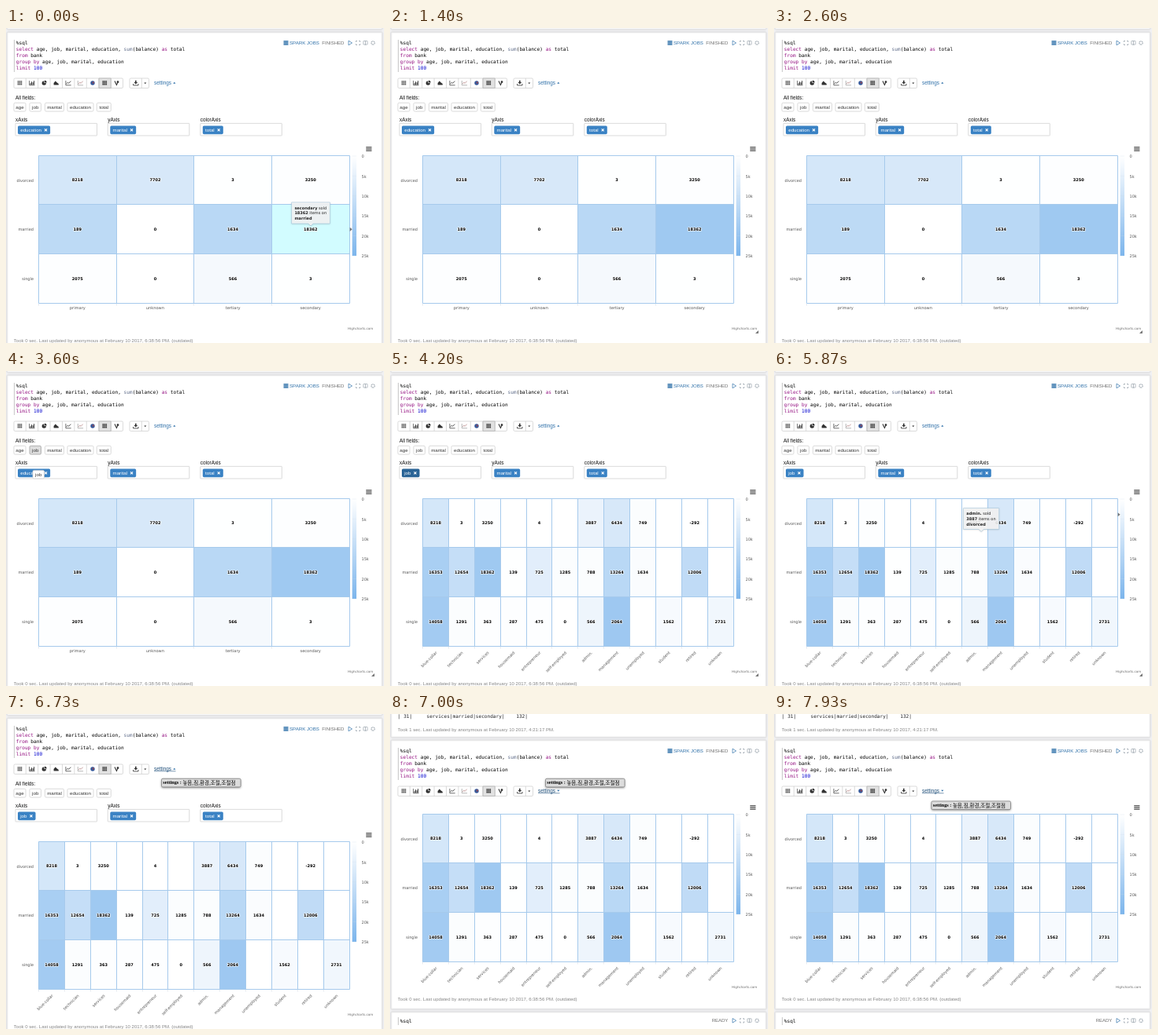
An HTML page with a canvas that plays this animation: 480x401 px, repeating every 8000 ms.

```html
<!DOCTYPE html>
<html lang="en">
<head>
<meta charset="utf-8">
<title>Notebook heatmap</title>
<style>
html, body { margin: 0; width: 100%; height: 100%; overflow: hidden; background: #fff; }
canvas { display: block; width: 480px; height: 401px; }
</style>
</head>
<body>
<canvas id="stage" width="480" height="401"></canvas>
<script>
const ctx = document.getElementById('stage').getContext('2d');
const LOOP = 8000;
const SANS = '"Liberation Sans", Arial, sans-serif';
const CHART = '"DejaVu Sans", sans-serif';
const MONO = '"DejaVu Sans Mono", monospace';
const LINK = '#3071a9', GREY = '#6c6c6c', DARK = '#333', LABEL = '#555', NOTE = '#858585';

// Times in ms at which the state of the page changes
const HOVER_OUT = 330, HANDLE_ON = 1270, DRAG = 2800, DRAG_END = 3450, DROP = 3870;
const CHIP_OUT = 4600, HANDLE_OFF = 6270, POPUP = 6530, COLLAPSE = 6930;

const ROWS = ['divorced', 'married', 'single'];
const PLOT = { left: 41.5, top: 162.3, width: 394.5, height: 188 };

// Each cell is "label" or "label:heat" where overlapping points hide the stronger one
const byEducation = {
  columns: ['primary', 'unknown', 'tertiary', 'secondary'],
  cells: ['8218 7702 3:100 3250:300', '189:12654 0 1634:13264 18362', '2075:300 0 566:2000 3:100']
};
const byJob = {
  columns: ['blue-collar', 'technician', 'services', 'housemaid', 'entrepreneur', 'self-employed',
    'admin.', 'management', 'unemployed', 'student', 'retired', 'unknown'],
  cells: [
    '8218 3 3250:300 - 4 - 3887 6434:7702 749 - -292:0 -',
    '16353 12654:11000 18362 139 725:5600 1285:800 788 13264 1634:900 - 12006 -',
    '14058:17600 1291:700 363 287 475 0 566:3300 2064:18600 - 1562 - 2731'
  ]
};
for (const data of [byEducation, byJob]) {
  data.cells = data.cells.map(row => row.split(' ').map(cell => {
    if (cell === '-') return { label: '', heat: 0 };
    const [label, heat] = cell.split(':');
    return { label, heat: +(heat ?? label) };
  }));
}

// Pointer stops over the job chart: time, column, row, value
const stops = [
  [4730, 1, 0, 3], [4900, 3, 1, 139], [5030, 5, 1, 1285], [5225, 7, 0, 7702],
  [5600, 7, 1, 13264], [5800, 6, 0, 3887], [5930, 5, 0, 0]
];
const JOB_OUT = 5960;

const clamp = v => Math.max(0, Math.min(1, v));
const ease = v => { v = clamp(v); return v * v * (3 - 2 * v); };
const crisp = v => Math.floor(v) + 0.5;

function heatColor(value, hover) {
  const k = clamp(value / 25000);
  const rgb = [124, 181, 236].map(c => Math.min(255, Math.round(255 + (c - 255) * k + (hover ? 51 : 0))));
  return `rgb(${rgb})`;
}

function text(str, x, y, font, color, align = 'left') {
  ctx.font = font;
  ctx.fillStyle = color;
  ctx.textAlign = align;
  ctx.textBaseline = 'middle';
  ctx.fillText(str, x, y);
  return ctx.measureText(str).width;
}

function box(x, y, w, h, fill, stroke, radius = 0, line = 0.7) {
  ctx.beginPath();
  ctx.roundRect(x, y, w, h, radius);
  if (fill) { ctx.fillStyle = fill; ctx.fill(); }
  if (stroke) { ctx.strokeStyle = stroke; ctx.lineWidth = line; ctx.stroke(); }
}

function path(points, { fill, stroke, line = 0.8, close }) {
  ctx.beginPath();
  for (let i = 0; i < points.length; i += 2) ctx.lineTo(points[i], points[i + 1]);
  if (close) ctx.closePath();
  if (fill) { ctx.fillStyle = fill; ctx.fill(); }
  if (stroke) { ctx.strokeStyle = stroke; ctx.lineWidth = line; ctx.stroke(); }
}

function disc(x, y, r, fill, from = 0, to = Math.PI * 2) {
  ctx.beginPath();
  ctx.moveTo(x, y);
  ctx.arc(x, y, r, from, to);
  ctx.fillStyle = fill;
  ctx.fill();
}

function shifted(dy, draw) {
  ctx.save();
  ctx.translate(0, dy);
  draw();
  ctx.restore();
}

function card(top, bottom) {
  ctx.save();
  ctx.shadowColor = 'rgba(0,0,0,.18)';
  ctx.shadowBlur = 2;
  box(1.5, top, 476, bottom - top, '#fff', '#e8e8ea', 1);
  ctx.restore();
}

function controls(y) {
  path([435, y - 2.8, 439.5, y, 435, y + 2.8], { stroke: LINK, line: 0.7, close: true });
  for (const [sx, sy] of [[-1, -1], [1, -1], [-1, 1], [1, 1]]) {
    path([447 + sx * 2.6, y + sy, 447 + sx * 2.6, y + sy * 2.6, 447 + sx, y + sy * 2.6], { stroke: '#9aa4ad' });
  }
  box(453.8, y - 2.5, 5.2, 4.6, null, '#9aa4ad', 0.5);
  path([456.4, y - 2.5, 456.4, y + 2.8], { stroke: '#9aa4ad' });
  ctx.beginPath();
  ctx.arc(466, y, 2.1, 0, Math.PI * 2);
  ctx.strokeStyle = '#9aa4ad';
  ctx.lineWidth = 1.2;
  ctx.setLineDash([1.1, 0.55]);
  ctx.stroke();
  ctx.setLineDash([]);
}

function query() {
  const keywords = /^(select|from|group|by|as|limit)$/;
  const lines = ['%sql', 'select age, job, marital, education, sum(balance) as total', 'from bank',
    'group by age, job, marital, education', 'limit 100'];
  path([10.5, 15, 10.5, 56], { stroke: '#c8c8c8', line: 1 });
  lines.forEach((line, i) => {
    let x = 12.8;
    for (const part of line.match(/\w+|\W+/g)) {
      const color = keywords.test(part) ? '#930f80' : part === 'sum' ? '#5c6a88' : /^\d/.test(part) ? '#0000cd' : '#000';
      x += text(part, x, 19.7 + i * 8, `6.15px ${MONO}`, color);
    }
  });
}

function chartIcons() {
  const y = 70;
  const at = i => 17.6 + i * 15.4;
  const grid = (x, color) => {
    for (let i = 0; i < 9; i++) box(x - 2.9 + (i % 3) * 2, y - 2.7 + Math.floor(i / 3) * 1.9, 1.6, 1.4, color);
  };
  box(10, 64, 138.5, 12.5, '#fff', '#ccc', 1.5);
  box(118, 64, 15.3, 12.5, '#e2e2e2', '#adadad');
  for (let i = 1; i < 9; i++) path([9.9 + i * 15.4, 64, 9.9 + i * 15.4, 76.5], { stroke: '#ccc', line: 0.7 });
  grid(at(0), '#444');
  path([at(1) - 3.3, y - 3, at(1) - 3.3, y + 2.8, at(1) + 3.5, y + 2.8], { stroke: DARK, line: 0.7 });
  [2, 4, 3, 5].forEach((h, i) => box(at(1) - 2.4 + i * 1.5, y + 2.2 - h, 1, h, DARK));
  disc(at(2), y, 2.8, DARK, 0.1, Math.PI * 1.5);
  disc(at(2) + 0.6, y - 0.6, 2.7, DARK, -Math.PI / 2, 0);
  path([at(3) - 3.2, y + 2.6, at(3) - 3.2, y, at(3) - 1, y - 2.4, at(3) + 1, y - 0.6, at(3) + 3, y + 1, at(3) + 3, y + 2.6], { fill: DARK });
  for (const [i, color] of [[4, DARK], [5, '#999']]) {
    path([at(i) - 3.3, y - 3, at(i) - 3.3, y + 2.8, at(i) + 3.5, y + 2.8], { stroke: color, line: 0.7 });
    path([at(i) - 2.6, y + 1.2, at(i) - 0.8, y - 0.8, at(i) + 0.6, y + 0.4, at(i) + 3, y - 2.4], { stroke: i === 5 ? '#b98a8a' : color });
  }
  disc(at(6), y, 2.7, '#35589a');
  disc(at(6) + 0.8, y - 0.5, 1.2, '#8d4a5c');
  grid(at(7), '#222');
  path([at(8) - 2.8, y - 2.4, at(8) - 0.4, y + 2.5, at(8) + 1, y - 0.4], { stroke: DARK, line: 1.1 });
  disc(at(8) + 1.2, y - 1.3, 1.4, DARK);

  box(157, 64, 24.5, 12.5, '#fff', '#ccc', 1.5);
  path([172.3, 64, 172.3, 76.5], { stroke: '#ccc', line: 0.7 });
  box(164, 66.8, 1.6, 2.6, DARK);
  path([162.4, 69, 167.2, 69, 164.8, 71.4], { fill: DARK });
  path([161.6, 71, 161.6, 73, 168, 73, 168, 71], { stroke: DARK });
  path([175.3, 69.4, 178.3, 69.4, 176.8, 71.2], { fill: DARK });
}

function header(t) {
  query();
  for (let i = 0; i < 3; i++) box(352.5, 16.2 + i * 2, 6, 1.5, LINK);
  text('SPARK JOBS', 360, 19.2, `6.1px ${SANS}`, LINK);
  text('FINISHED', 401.3, 19.2, `6px ${SANS}`, GREY);
  controls(19);
  chartIcons();
  const open = t < COLLAPSE;
  const hovered = t >= 6400;
  const width = text('settings', 188, 70, `6.4px ${SANS}`, hovered ? '#23527c' : LINK);
  const tip = open ? -1 : 1;
  path([212.2, 69.7 - tip, 215.4, 69.7 - tip, 213.8, 69.7 + tip], { fill: LINK });
  if (hovered) path([188, 72.8, 188 + width + 5.5, 72.8], { stroke: '#23527c', line: 0.6 });
}

function axisChip(name, x, hover) {
  ctx.font = `6.2px ${SANS}`;
  const width = ctx.measureText(name).width + 14.3;
  box(x, 124.4, width, 10.8, hover ? '#2a6496' : '#3a82c4', null, 1.6);
  text(name, x + 3.2, 130.2, `6.2px ${SANS}`, '#fff');
  const cx = x + width - 5.6;
  path([cx - 1.5, 128.3, cx + 1.5, 131.3], { stroke: '#fff', line: 1.1 });
  path([cx - 1.5, 131.3, cx + 1.5, 128.3], { stroke: '#fff', line: 1.1 });
}

function settings(t) {
  const dragging = t >= DRAG && t < DROP;
  text('All fields:', 12, 89, `6.3px ${SANS}`, '#111');
  const fields = [['age', 10, 15], ['job', 30, 14.5], ['marital', 49.5, 24], ['education', 78, 33], ['total', 115.3, 18]];
  for (const [name, x, w] of fields) {
    const active = name === 'job' && dragging;
    box(x, 95.3, w, 10.8, active ? '#dedede' : '#fff', active ? '#999' : '#ccc', 1.5);
    text(name, x + w / 2, 101.2, `6.2px ${SANS}`, DARK, 'center');
  }
  const axes = [['xAxis', t < DROP ? 'education' : 'job', 12], ['yAxis', 'marital', 129.3], ['colorAxis', 'total', 246.8]];
  for (const [title, value, x] of axes) {
    text(title, x, 117.5, `6.4px ${SANS}`, '#111');
    box(x, 121.4, 103.5, 15.6, '#fff', '#ccc', 0.5);
    axisChip(value, x + 3, value === 'job' && t < CHIP_OUT);
  }
  if (dragging) {
    const k = ease((t - DRAG) / (DRAG_END - DRAG));
    const x = 30 + 4 * k, y = 95.4 + 31 * k;
    box(x, y, 14.5, 10.6, '#fff', '#ccc', 1.5);
    text('job', x + 7.2, y + 5.6, `6.2px ${SANS}`, DARK, 'center');
  }
}

// Tooltip and hovered cell at time t
function pointer(t) {
  if (t < 870) {
    return { col: 3, row: 1, value: 18362, x: 387, y: 249, hover: t < HOVER_OUT, alpha: clamp((870 - t) / 150) };
  }
  if (t < stops[0][0] || t >= HANDLE_OFF) return null;
  const centre = ([, col, row]) => [PLOT.left + (col + 0.5) * PLOT.width / 12, PLOT.top + (row + 0.5) * PLOT.height / 3 - 7];
  let [x, y] = centre(stops[0]);
  let current = stops[0];
  stops.forEach((stop, i) => {
    if (t < stop[0]) return;
    const until = Math.min(t, stops[i + 1]?.[0] ?? t);
    const k = 1 - Math.exp((stop[0] - until) / 50);
    const [tx, ty] = centre(stop);
    x += (tx - x) * k;
    y += (ty - y) * k;
    current = stop;
  });
  return { col: current[1], row: current[2], value: current[3], x, y, hover: t < JOB_OUT, alpha: clamp((HANDLE_OFF - t) / 150) };
}

function tooltip(p, columns) {
  const bold = `bold 5px ${CHART}`, plain = `5px ${CHART}`;
  const lines = [[columns[p.col], ' sold'], [String(p.value), ' items on'], [ROWS[p.row], '']];
  const width = Math.max(...lines.map(([a, b]) => {
    ctx.font = bold;
    const w = ctx.measureText(a).width;
    ctx.font = plain;
    return w + ctx.measureText(b).width;
  })) + 8;
  const left = p.x - width / 2, top = p.y - 27;
  const outline = [left, top, left + width, top, left + width, p.y, p.x + 3, p.y, p.x, p.y + 3, p.x - 3, p.y, left, p.y];
  ctx.save();
  ctx.globalAlpha = p.alpha;
  ctx.shadowColor = 'rgba(0,0,0,.25)';
  ctx.shadowBlur = 2;
  ctx.shadowOffsetY = 0.6;
  path(outline, { fill: 'rgba(249,249,249,.87)', close: true });
  ctx.shadowColor = 'transparent';
  path(outline, { stroke: '#a5c6dc', line: 0.6, close: true });
  lines.forEach(([a, b], i) => {
    const y = top + 7.4 + i * 6.7;
    const w = text(a, left + 3.8, y, bold, '#222');
    text(b, left + 3.8 + w, y, plain, '#222');
  });
  ctx.restore();
}

function colorAxis(marker) {
  const top = 163, height = 127;
  const fill = ctx.createLinearGradient(0, top, 0, top + height);
  fill.addColorStop(0, '#fff');
  fill.addColorStop(1, '#7cb5ec');
  box(439.6, top, 5.4, height, fill);
  for (let i = 0; i <= 5; i++) {
    const y = top + i * height / 5;
    path([439.6, y, 445, y], { stroke: 'rgba(200,215,230,.6)', line: 0.4 });
    text(i ? i * 5 + 'k' : '0', 451.5, y + 0.9, `5px ${CHART}`, LABEL);
  }
  if (marker !== null) {
    const y = top + marker / 25000 * height;
    path([436.6, y - 2.6, 439.6, y, 436.6, y + 2.6], { fill: '#777' });
  }
}

function chart(t) {
  const data = t < DROP ? byEducation : byJob;
  const p = pointer(t);
  const count = data.columns.length;
  const w = PLOT.width / count, h = PLOT.height / 3;
  const colX = c => crisp(PLOT.left + c * w), rowY = r => crisp(PLOT.top + r * h);

  for (let i = 0; i < 3; i++) box(457.2, 151.2 + i * 2.2, 7.2, 1.2, '#444');
  data.cells.forEach((row, r) => {
    text(ROWS[r], 35, PLOT.top + (r + 0.5) * h + 0.7, `5px ${CHART}`, LABEL, 'right');
    row.forEach((cell, c) => {
      const hover = p && p.hover && p.col === c && p.row === r;
      const x = colX(c), y = rowY(r);
      box(x, y, colX(c + 1) - x, rowY(r + 1) - y, heatColor(cell.heat, hover));
    });
  });
  const line = { stroke: '#a6caec', line: 1 };
  for (let c = 0; c <= count; c++) path([colX(c), rowY(0), colX(c), rowY(3)], line);
  for (let r = 0; r <= 3; r++) path([colX(0), rowY(r), colX(count), rowY(r)], line);

  data.cells.forEach((row, r) => row.forEach((cell, c) => {
    const x = PLOT.left + (c + 0.5) * w, y = PLOT.top + (r + 0.5) * h + 0.4;
    ctx.font = `bold 5px ${CHART}`;
    ctx.textAlign = 'center';
    ctx.textBaseline = 'middle';
    ctx.strokeStyle = 'rgba(255,255,255,.8)';
    ctx.lineWidth = 1.6;
    ctx.lineJoin = 'round';
    ctx.strokeText(cell.label, x, y);
    text(cell.label, x, y, `bold 5px ${CHART}`, '#000', 'center');
  }));
  data.columns.forEach((name, c) => {
    const x = PLOT.left + (c + 0.5) * w;
    path([colX(c), 351, colX(c), 353.5], { stroke: '#d4dce6', line: 0.6 });
    if (count === 4) return text(name, x, 356.8, `5.1px ${CHART}`, LABEL, 'center');
    ctx.save();
    ctx.translate(x + 1.3, 358);
    ctx.rotate(-Math.PI / 4);
    text(name, 0, 0, `5px ${CHART}`, LABEL, 'right');
    ctx.restore();
  });
  colorAxis(p && p.hover ? p.value : null);
  text('Highcharts.com', 466.3, 382.5, `4.1px ${CHART}`, '#6a6a6a', 'right');
  if (t >= HANDLE_ON && t < HANDLE_OFF) path([467.8, 385, 467.8, 388.8, 464, 388.8], { fill: '#666' });
  if (p) tooltip(p, data.columns);
  text('Took 0 sec. Last updated by anonymous at February 10 2017, 6:38:56 PM. (outdated)',
    9.8, 398.7, `6px ${SANS}`, NOTE);
}

function popup(t) {
  if (t < POPUP) return;
  const [x, y] = t < 7330 ? [197.5, 82.3] : [200, 111];
  ctx.save();
  ctx.shadowColor = 'rgba(0,0,0,.5)';
  ctx.shadowBlur = 3;
  ctx.shadowOffsetY = 1;
  box(x, y, 100.5, 10.6, '#dcdcdc', null, 1.5);
  ctx.restore();
  box(x, y, 100.5, 10.6, null, '#777', 1.5);
  const w = text('settings : ', x + 1.8, y + 5.4, 'bold 6.2px "Liberation Serif", Times, serif', '#000');
  text('놓음,짐,환경,조절,조절점', x + 1.8 + w, y + 5.2, '6.5px "Noto Sans CJK KR", "Noto Sans CJK", sans-serif', '#000');
}

function render(t) {
  const collapsed = t >= COLLAPSE;
  const topShift = collapsed ? 28 : 0;
  const chartShift = collapsed ? -35 : 0;
  ctx.fillStyle = '#f1f1f3';
  ctx.fillRect(0, 0, 480, 401);
  card(-40, 1.5 + topShift);
  card(5.5 + topShift, 410.5 + chartShift);
  if (collapsed) {
    text('| 31|     services|married|secondary|    132|', 9.8, 3, `6.1px ${MONO}`, '#222');
    text('Took 1 sec. Last updated by anonymous at February 10 2017, 4:21:17 PM.', 9.8, 20.4, `6px ${SANS}`, NOTE);
    card(379.5, 440);
    path([10.5, 386, 10.5, 396], { stroke: '#c8c8c8', line: 1 });
    text('%sql', 12.8, 391, `6.15px ${MONO}`, '#000');
    text('READY', 429.3, 390.5, `6px ${SANS}`, GREY, 'right');
    controls(390.3);
  }
  shifted(topShift, () => header(t));
  if (!collapsed) settings(t);
  shifted(chartShift, () => chart(t));
  popup(t);
}

function tick() {
  render(performance.now() % LOOP);
  requestAnimationFrame(tick);
}
tick();
</script>
</body>
</html>
```
